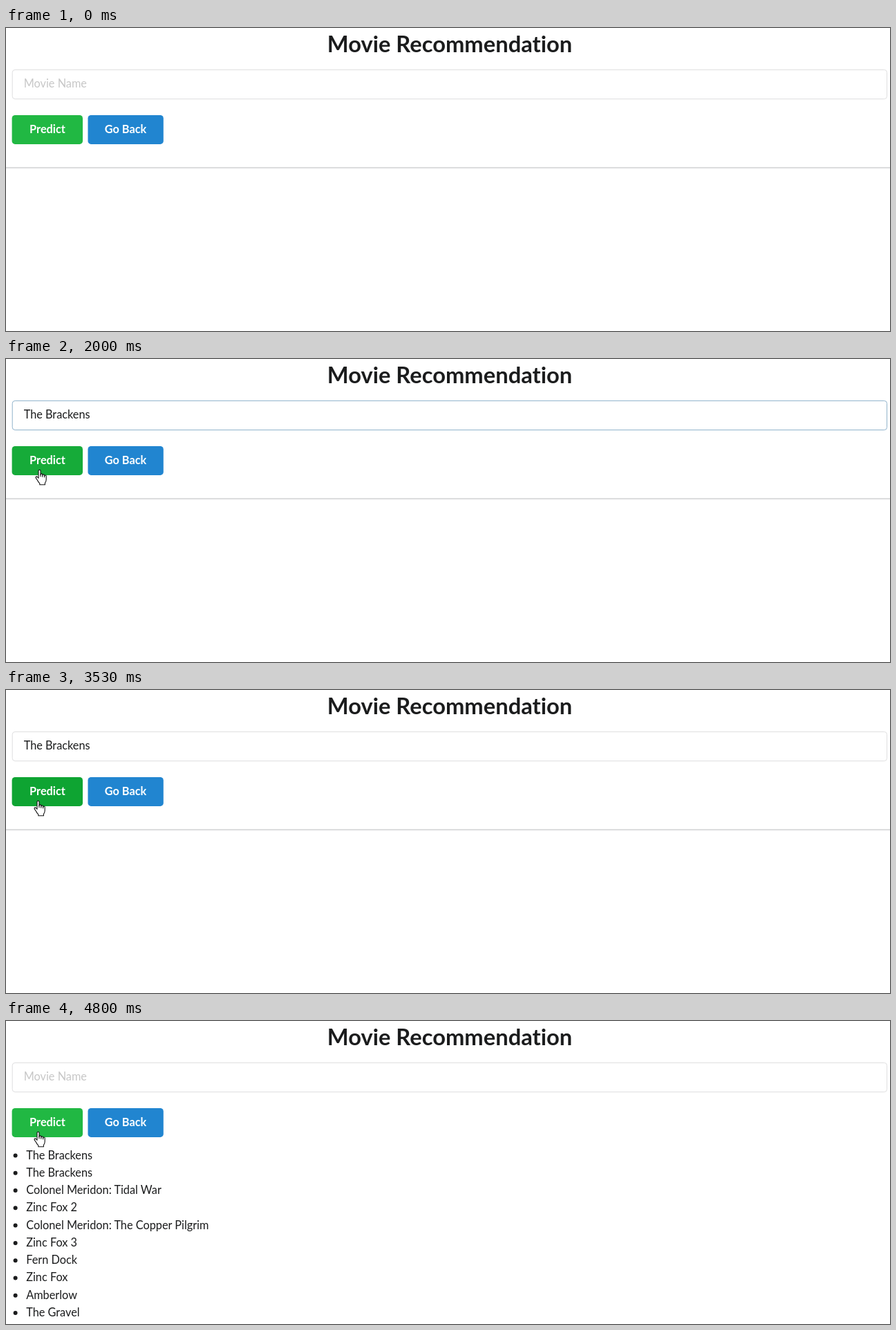
Recreate the animation shown at these times as an HTML page. Size 1279 by 438 pixels, loop 4.87 s.

```html
<!DOCTYPE html>
<html lang="en">
<head>
<meta charset="utf-8">
<title>Movie Recommendation</title>
<style>
  html, body { margin: 0; width: 100%; height: 100%; overflow: hidden; background: #fff; }
  svg {
    display: block; width: 100%; height: 100%; fill: #1b1c1d;
    font: 16.3px Lato, sans-serif; font-variant-ligatures: none;
  }
  .title { font-size: 32.7px; font-weight: 700; text-anchor: middle; }
  .label { font-weight: 700; fill: #fff; text-anchor: middle; }
  .pointer { fill: #fff; stroke: #111; stroke-width: 1.1; stroke-linejoin: round; }
</style>
</head>
<body>
<svg viewBox="0 0 1279 438">
  <text class="title" x="642" y="34.7">Movie Recommendation</text>

  <rect id="field" x="9.2" y="60.4" width="1265.4" height="42.2" rx="4" fill="#fff"/>
  <text id="entry" x="25.7" y="86.4"></text>
  <path id="caret" d="M123.5 72V90" stroke="#111"/>

  <rect id="predict" x="8.6" y="125.9" width="102.4" height="42" rx="4.5"/>
  <text class="label" x="60" y="152.3">Predict</text>
  <rect x="118.5" y="125.9" width="109.3" height="42" rx="4.5" fill="#2185d0"/>
  <text class="label" x="173" y="152.3">Go Back</text>

  <g id="edge">
    <path d="M0 201.5H1279" stroke="#d6d7d8"/>
    <path d="M0 202.5H1279" stroke="#e6e6e7"/>
    <path d="M0 203.5H1279" stroke="#f6f6f6"/>
  </g>
  <g id="list"></g>

  <g id="cursor">
    <path id="beam" d="M-3.5 -7.5H-1L0 -6.5L1 -7.5H3.5M0 -6.5V6.5M-3.5 7.5H-1L0 6.5L1 7.5H3.5" fill="none" stroke="#333"/>
    <path id="arrow" class="pointer" d="M0 0V16L3.7 12.5L6.2 18.2L8.6 17.1L6.2 11.6H11.3Z"/>
    <g id="hand" class="pointer">
      <path d="M-1.5 12V1.5a1.5 1.5 0 0 1 3 0V7a1.4 1.4 0 0 1 2.8 0V8a1.4 1.4 0 0 1 2.8 0V9a1.3 1.3 0 0 1 2.6 0V14q0 3-1.8 5V21.5H.3V19.5Q-2 17.5-3 15L-5.2 11.8Q-6 10-4.4 9.6Q-3.2 9.5-1.5 12Z"/>
      <path d="M1.5 6V10M4.3 7.5V10.5M7.1 8.5V11" fill="none"/>
    </g>
  </g>
</svg>
<script>
const LOOP = 4870, STEP = 1000 / 15;
const MOVIE = "The Brackens";
const RESULTS = [
  MOVIE, MOVIE, "Colonel Meridon: Tidal War", "Zinc Fox 2",
  "Colonel Meridon: The Copper Pilgrim", "Zinc Fox 3", "Fern Dock",
  "Zinc Fox", "Amberlow", "The Gravel"
];
const el = id => document.getElementById(id);
const show = (id, on) => el(id).style.display = on ? "" : "none";
const between = (t, a, b) => t >= a && t < b;
const ramp = (t, a, b) => Math.min(1, Math.max(0, (t - a) / (b - a)));
const lerp = (a, b, p) => a + (b - a) * p;
const mix = (a, b, p) => `rgb(${a.map((v, i) => lerp(v, b[i], p))})`;

// Follows [start, end, color] fades, each taking over from the one before.
function fade(t, first, stages) {
  let from = first, color = mix(first, first, 0);
  for (const [start, end, to] of stages) {
    if (t < start) break;
    color = mix(from, to, ramp(t, start, end));
    from = to;
  }
  return color;
}

const GREY = [222, 222, 223], FOCUS = [143, 178, 203];
const HINT = [199, 199, 199], HINT_FOCUS = [133, 133, 133];
const GREEN = [33, 184, 67], HOVER = [22, 171, 57];
const PRESSED = [25, 143, 53], ACTIVE = [14, 164, 50];

el("list").innerHTML = RESULTS.map((name, i) => {
  const y = 199.5 + i * 25.28;
  return `<circle cx="13.6" cy="${y - 5}" r="3"/><text x="29.2" y="${y}">${name}</text>`;
}).join("");

function cursorAt(t) {
  const p = ramp(t, 1460, 1866), eased = p * p * (3 - 2 * p);
  return [lerp(396, 48.5, eased) - 2 * ramp(t, 2060, 2260), lerp(71.5, 160.3, eased)];
}

function draw(now) {
  const t = Math.floor((now % LOOP + 7) / STEP) * STEP;
  const loaded = t >= 3790, typed = between(t, 990, 3790);

  el("field").setAttribute("stroke", loaded ? mix(GREY, GREY, 0) :
    fade(t, GREY, [[370, 470, FOCUS], [2740, 2840, GREY]]));
  el("entry").textContent = typed ? MOVIE : "Movie Name";
  el("entry").setAttribute("fill", typed ? "#1b1c1d" : loaded ? mix(HINT, HINT, 0) :
    fade(t, HINT, [[370, 470, HINT_FOCUS]]));

  show("caret", between(t, 390, 860) || between(t, 990, 1530) || between(t, 2060, 2530));
  const caretX = typed ? 26 + el("entry").getComputedTextLength() : 26;
  el("caret").setAttribute("d", `M${Math.round(caretX) + .5} 72V90`);

  el("predict").setAttribute("fill", loaded ? mix(GREEN, GREEN, 0) :
    fade(t, GREEN, [[1890, 1990, HOVER], [2750, 2850, PRESSED], [2900, 3000, ACTIVE]]));
  show("edge", !loaded);
  show("list", loaded);

  const [x, y] = cursorAt(t);
  const onField = y < 103;
  const onButton = between(y, 126, 168) && (between(x, 9, 111) || between(x, 118, 228));
  show("cursor", t >= 1390);
  show("beam", onField);
  show("hand", onButton);
  show("arrow", !onField && !onButton);
  el("cursor").setAttribute("transform", `translate(${x} ${y})`);
}

const begin = performance.now();
function tick() {
  draw(performance.now() - begin);
  requestAnimationFrame(tick);
}
tick();
</script>
</body>
</html>
```
